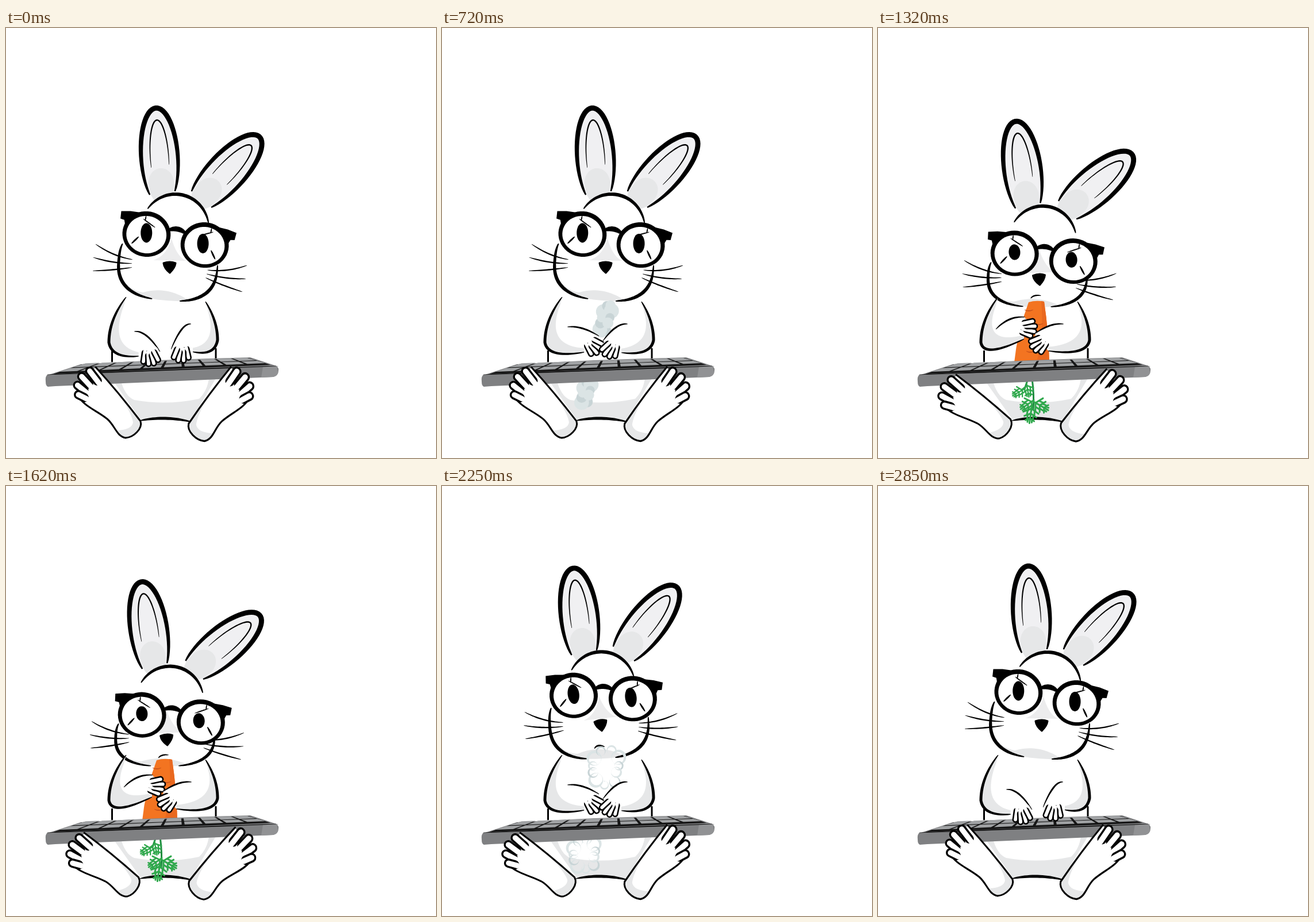
Animation of 748x748 px, one loop 2880 ms. Source, as an HTML page with a canvas:

```html
<!DOCTYPE html>
<html lang="en">
<head>
<meta charset="utf-8">
<title>Rabbit at the keyboard</title>
<style>
html, body { margin: 0; width: 100%; height: 100%; overflow: hidden; background: #fff; }
canvas { display: block; width: 748px; height: 748px; }
</style>
</head>
<body>
<canvas id="stage" width="748" height="748"></canvas>
<script>
const ctx = document.getElementById('stage').getContext('2d');
const LOOP = 2880, SHADE = '#e6e7e8', RAD = Math.PI / 180;
const { sin, cos, min, max, hypot, PI } = Math;

const mix = (a, b, u) => a + (b - a) * u;
const ease = (t, a, b) => {
  const u = min(1, max(0, (t - a) / (b - a)));
  return u * u * (3 - 2 * u);
};

function group(draw) {
  ctx.save();
  draw();
  ctx.restore();
}

function spin(x, y, deg) {
  ctx.translate(x, y);
  ctx.rotate(deg * RAD);
  ctx.translate(-x, -y);
}

// Points on a tilted ellipse; pow below 1 makes it squarer.
function arc(cx, cy, rx, ry, deg, from, to, pow = 1) {
  const c = cos(deg * RAD), s = sin(deg * RAD);
  const bow = v => Math.sign(v) * Math.abs(v) ** pow;
  return Array.from({ length: 49 }, (_, i) => {
    const a = mix(from, to, i / 48) * RAD, x = rx * bow(cos(a)), y = ry * bow(sin(a));
    return [cx + x * c - y * s, cy + x * s + y * c];
  });
}

// Points on a quadratic curve.
function bend(x0, y0, cx, cy, x1, y1) {
  return Array.from({ length: 21 }, (_, i) => {
    const u = i / 20;
    return [mix(mix(x0, cx, u), mix(cx, x1, u), u), mix(mix(y0, cy, u), mix(cy, y1, u), u)];
  });
}

function poly(pts, color) {
  ctx.beginPath();
  pts.forEach(p => ctx.lineTo(...p));
  ctx.closePath();
  ctx.fillStyle = color;
  ctx.fill();
}

// Brush stroke, thin at its ends.
function ink(pts, w, color = '#000') {
  const n = pts.length - 1, left = [], right = [];
  pts.forEach(([x, y], i) => {
    const a = pts[max(0, i - 1)], b = pts[min(n, i + 1)];
    const len = hypot(b[0] - a[0], b[1] - a[1]) || 1;
    const h = w / 2 * (.25 + .75 * max(0, sin(PI * i / n)) ** .6);
    const nx = (a[1] - b[1]) / len * h, ny = (b[0] - a[0]) / len * h;
    left.push([x + nx, y + ny]);
    right.unshift([x - nx, y - ny]);
  });
  poly(left.concat(right), color);
}

const line = (x0, y0, x1, y1, w) => ink(bend(x0, y0, (x0 + x1) / 2, (y0 + y1) / 2, x1, y1), w);
const oval = (x, y, rx, ry, deg, color) => poly(arc(x, y, rx, ry, deg, 0, 360), color);

function shape(path, fill, width) {
  const s = new Path2D(path);
  if (fill) { ctx.fillStyle = fill; ctx.fill(s); }
  if (width) {
    ctx.lineWidth = width;
    ctx.strokeStyle = '#000';
    ctx.lineCap = ctx.lineJoin = 'round';
    ctx.stroke(s);
  }
}

// Finger or toe: outlined capsule from its tip back into the limb.
function digit(x, y, dx, dy, w, edge) {
  ctx.lineCap = 'round';
  for (const [width, reach, color] of [[w, 1, '#000'], [w - 2 * edge, 1.4, '#fff']]) {
    ctx.lineWidth = width;
    ctx.strokeStyle = color;
    ctx.beginPath();
    ctx.moveTo(x, y);
    ctx.lineTo(x + dx * reach, y + dy * reach);
    ctx.stroke();
  }
}

function belly() {
  shape('M185 612L366 608L321 684L234 681Z', SHADE);
  shape('M199 610Q206 640 223 647Q280 657 336 645Q351 630 353 608Z', '#fff');
  ink(bend(233, 683, 277, 674, 322, 685), 5);
  shape('M184.5 562V580M365 558V576', null, 3);
}

function ear(x, y, deg) {
  group(() => {
    ctx.translate(x, y);
    ctx.rotate(deg * RAD);
    const edge = arc(0, 0, 32, 86, 0, 132, 405);
    poly(edge, '#f0f0f2');
    poly(arc(0, 44, 22, 25, 0, 180, 360).concat(arc(0, 0, 30, 84, 0, 45, 132)), SHADE);
    ink(edge, 9);
    ink(arc(0, 0, 16, 65, 0, 165, 372), 2.4);
  });
}

function glasses(down) {
  ctx.translate(295, 368 + 12 * down);
  ctx.rotate(10.7 * RAD);
  for (const side of [-1, 1]) {
    oval(side * 51.5, 0, 42, 39.5, 0, '#000');
    oval(side * 51.5, 1, 35, 32.5, 0, '#fff');
    oval(side * 50 - 2, -2, 10, 17 - 4 * down, -10.7, '#000');
    group(() => {
      ctx.scale(side, 1);
      poly([[102, -31], [86, -34], [68, -35], [86, -16], [91, -9], [94, -17], [101, -18]], '#000');
      line(62, -25, 39, -14, 2);
      line(58, -31, 58, -22, 2);
      line(64, 7, 74, 21, 3);
    });
  }
  ink(bend(-16, -13, 0, -24, 16, -13), 9);
}

function whiskers() {
  const ray = (r, deg, side) => [side * r * cos(deg * RAD), -r * sin(deg * RAD)];
  ctx.translate(285, 413);
  ctx.rotate(8 * RAD);
  for (const side of [-1, 1]) {
    for (let k = 0; k < 3; k++) {
      ink(bend(...ray(134, 8 - 10 * k, side), ...ray(100, 1 - 7 * k, side), ...ray(66, 1 - 6 * k, side)), 2.4);
    }
  }
}

function head(down, tilt, mouth) {
  ctx.translate(-5 * down - 22 * tilt, 25 * down);
  spin(285, 415, -3.7 * down - 20 * tilt);
  group(() => {
    spin(270, 290, 12 * tilt - down);
    ear(267, 225, -4);
  });
  group(() => {
    spin(338, 300, 11 * down + 8 * tilt);
    ear(382, 252, 43);
  });

  const skull = arc(294, 350, 59, 61, 10, 206, 340);
  poly(skull.concat([[366, 415], [198, 410]]), '#fff');
  group(() => {
    ctx.translate(0, 415);
    ctx.scale(1, 1 - .2 * down);
    ctx.translate(0, -415);
    const jaw = (from, to) => arc(282, 410, 86, 64, 5, from, to, .77);
    poly(jaw(-10, 190), '#fff');
    poly(jaw(60, 165).concat(bend(200, 430, 212, 456, 238, 460), bend(238, 460, 280, 448, 318, 474)), SHADE);
    ink(jaw(100, 200), 6);
    ink(jaw(-2, 78), 6);
    if (mouth) ink(bend(268, 455, 274, 447, 286, 454 - 4 * down), 3);
  });
  ink(skull, 6);
  poly(bend(256, 404, 280, 396, 288, 366).concat(bend(288, 366, 296, 396, 313, 405)), '#ececed');
  group(whiskers);
  shape('M274 409Q285 405 295 409Q294 417 285 426Q275 418 274 409Z', '#000', 3);
  group(() => glasses(down));
}

// Feathery carrot leaf made of round strokes.
function sprig(x, y, deg, s) {
  group(() => {
    ctx.translate(x, y);
    ctx.rotate(deg * RAD);
    ctx.scale(s, s);
    ctx.strokeStyle = '#2fa84c';
    ctx.lineCap = 'round';
    ctx.lineWidth = 3.2;
    ctx.beginPath();
    ctx.moveTo(-6, 0);
    ctx.lineTo(27, 0);
    for (let k = 0; k < 3; k++) {
      const px = 9 * k, len = 14 - 3 * k;
      for (const side of [-1, 1]) {
        ctx.moveTo(px, 0);
        ctx.lineTo(px + len * .55, side * len);
        ctx.moveTo(px + len * .25, side * len * .45);
        ctx.lineTo(px + len * .9, side * len * .5);
      }
    }
    ctx.stroke();
  });
}

function carrot() {
  ctx.strokeStyle = '#1f8d40';
  ctx.lineWidth = 3;
  ctx.stroke(new Path2D('M268 610Q272 640 270 664M261 610L255 628'));
  sprig(251, 630, 150, .72);
  sprig(259, 622, 80, .75);
  sprig(267, 650, 145, .85);
  sprig(274, 652, 30, .95);
  sprig(267, 662, 98, .95);
  shape('M262 477Q275 473 289 476Q297 530 298 582H237Q242 530 262 477Z', '#f37421');
  shape('M284 475L289 476Q297 530 298 582H276Q289 530 284 475Z', '#e9681f');
  for (let k = 0; k < 4; k++) {
    const x = 262 - 7 * k + 24 * (k % 2), y = 490 + 24 * k;
    ink(bend(x - 7, y, x, y + 4, x + 8, y), 1.8, '#c9541b');
  }
}

// Ring of puffs: solid at first, thinning to crescents.
function poof(p) {
  if (p <= 0 || p >= 1) return;
  const e = 1 - (1 - p) ** 3, q = min(.84, max(0, (p - .12) * 2.2));
  for (const [cx, cy, s] of [[284, 514 - 28 * e, 1], [252 - 6 * e, 632 + 10 * e, .85]]) {
    for (let i = 0; i < 11; i++) {
      const a = i * 2 * PI / 11 + s, wob = .9 + .2 * sin(i * 7.3 + s);
      const dy = sin(a) * (20 + 10 * e) * wob * s;
      const dx = cos(a) * 36 * e * wob * s - dy * .35 * (1 - e);
      const r = (10 + 3 * sin(i * 4.1)) * min(1, p * 10), d = hypot(dx, dy) || 1;
      const x = cx + dx, y = cy + dy, off = r * (1 - q) / d;
      ctx.beginPath();
      ctx.arc(x, y, r, 0, 7);
      ctx.closePath();
      if (q > 0) {
        ctx.moveTo(x - dx * off + r * q, y - dy * off);
        ctx.arc(x - dx * off, y - dy * off, r * q, 0, 7);
      }
      ctx.fillStyle = i % 3 ? '#dbe4e5' : '#c8d4d6';
      ctx.fill('evenodd');
    }
  }
}

function keyboard() {
  shape('M72 604L130 585Q280 576 425 573L474 589Z', '#808183');
  shape('M82 602L132 585L422 574L460 586Z', '#161616');
  const at = (u, v) => [
    mix(mix(84, 458, u), mix(134, 422, u), v),
    mix(mix(600, 584, u), mix(584, 574, u), v)
  ];
  const cols = 10;
  for (let row = 0; row < 2; row++) {
    const v0 = row ? .6 : .12, v1 = row ? 1.05 : .52;
    for (let i = 0; i < cols; i++) {
      const u0 = (i + .07) / cols, u1 = (i + .93) / cols;
      poly([at(u0, v0), at(u1, v0), at(u1, v1), at(u0, v1)], '#a0a2a4');
    }
  }
  shape('M72 603L466 588Q475 588 474 596Q474 604 465 607L86 623L73 624Q69 623 69 615Q68 606 72 603Z', '#7f8082');
  shape('M447 589L470 588Q478 604 465 607L444 608Z', '#919294');
  line(72, 603, 470, 588, 1.6);
}

// Per pose: hand x, y and angle, then where the upper line starts.
const LEFT = { shoulder: [209, 468], elbow: [179, 547],
  poses: [[249, 562, 75, 223, 528], [257, 546, 40, 218, 520], [250, 521, 0, 205, 524]] };
const RIGHT = { shoulder: [347, 476], elbow: [368, 543],
  poses: [[306, 556, -80, 322, 515], [298, 550, -55, 323, 515], [288, 543, -35, 323, 515]] };

function arm({ shoulder, elbow, poses }, stage, lift, side) {
  const i = min(1, Math.floor(stage));
  const [x, y0, deg, sx, sy] = poses[i].map((v, k) => mix(v, poses[i + 1][k], stage - i));
  const y = y0 - lift, c = cos(deg * RAD), s = sin(deg * RAD), [ex, ey] = elbow;
  const at = (px, py) => [x + side * px * c - py * s, y + side * px * s + py * c];
  const top = at(6, -18), low = at(4, 20);
  const upper = bend(sx, sy, mix(sx, top[0], .45), min(sy, top[1]) - 3, ...top);
  const under = bend(ex, ey, ex + side * 5, ey + 28, ...low);
  const outer = bend(...shoulder, ex, mix(shoulder[1], ey, .5), ex, ey).concat(under);

  poly([...upper, ...under.slice().reverse()], '#fff');
  poly(outer.concat(bend(low[0], low[1] - 7, ex, ey + 6, shoulder[0] - side * 4, shoulder[1] + 15)), SHADE);
  ink(outer, 5);
  ink(upper, 3);
  group(() => {
    ctx.translate(x, y);
    ctx.rotate(deg * RAD);
    ctx.scale(side, 1);
    oval(3, 0, 13, 16, 0, '#fff');
    for (let k = 3; k >= 0; k--) {
      const a = (28 * k - 35) * RAD;
      digit(23 * cos(a), 19 * sin(a), -14, 3 - 3 * k, 11, 2.6);
    }
  });
}

function leg() {
  const sole = 'M156 590Q196 634 234 684C238 697 222 712 208 713C192 710 190 692 176 680C156 664 134 658 124 637';
  shape(sole, '#fff');
  shape('M200 642Q224 668 234 685Q236 702 210 712Q197 710 193 700Q219 699 221 686Q219 672 200 642', SHADE);
  shape(sole, null, 3);
  for (let k = 0; k < 4; k++) {
    const a = (250 - 30 * k) * RAD;
    digit(157 + 33 * cos(a), 627 + 32 * sin(a), 13 - k, 17 - 4 * k, 16, 3.4);
  }
}

function draw(t) {
  ctx.fillStyle = '#fff';
  ctx.fillRect(0, 0, 748, 748);

  const down = ease(t, 780, 1500) - ease(t, 1640, 1980);
  const tilt = ease(t, 2130, 2420) - ease(t, 2500, 2770);
  const stage = ease(t, 570, 690) + ease(t, 760, 900) - ease(t, 2060, 2220) - ease(t, 2650, 2800);
  const kick = ease(t, 690, 1110) - ease(t, 2330, 2830);
  const tap = t < 570 ? 4 * sin(2 * PI * t / 190) : 0;

  belly();
  group(() => head(down, tilt, t > 780 && t < 2740));
  if (t > 790 && t < 2125) carrot();
  poof((t - 666) / 540);
  poof((t - 1986) / 540);
  keyboard();
  arm(LEFT, stage, max(0, tap), 1);
  arm(RIGHT, stage, max(0, -tap), -1);
  group(() => {
    spin(215, 700, -11 * kick);
    leg();
  });
  group(() => {
    spin(335, 700, 4 * down);
    ctx.transform(-1, 0, .05, 1.045, 517.5, -26.5);
    leg();
  });
}

const start = performance.now();
function tick() {
  draw((performance.now() - start) % LOOP);
  requestAnimationFrame(tick);
}
tick();
</script>
</body>
</html>
```
